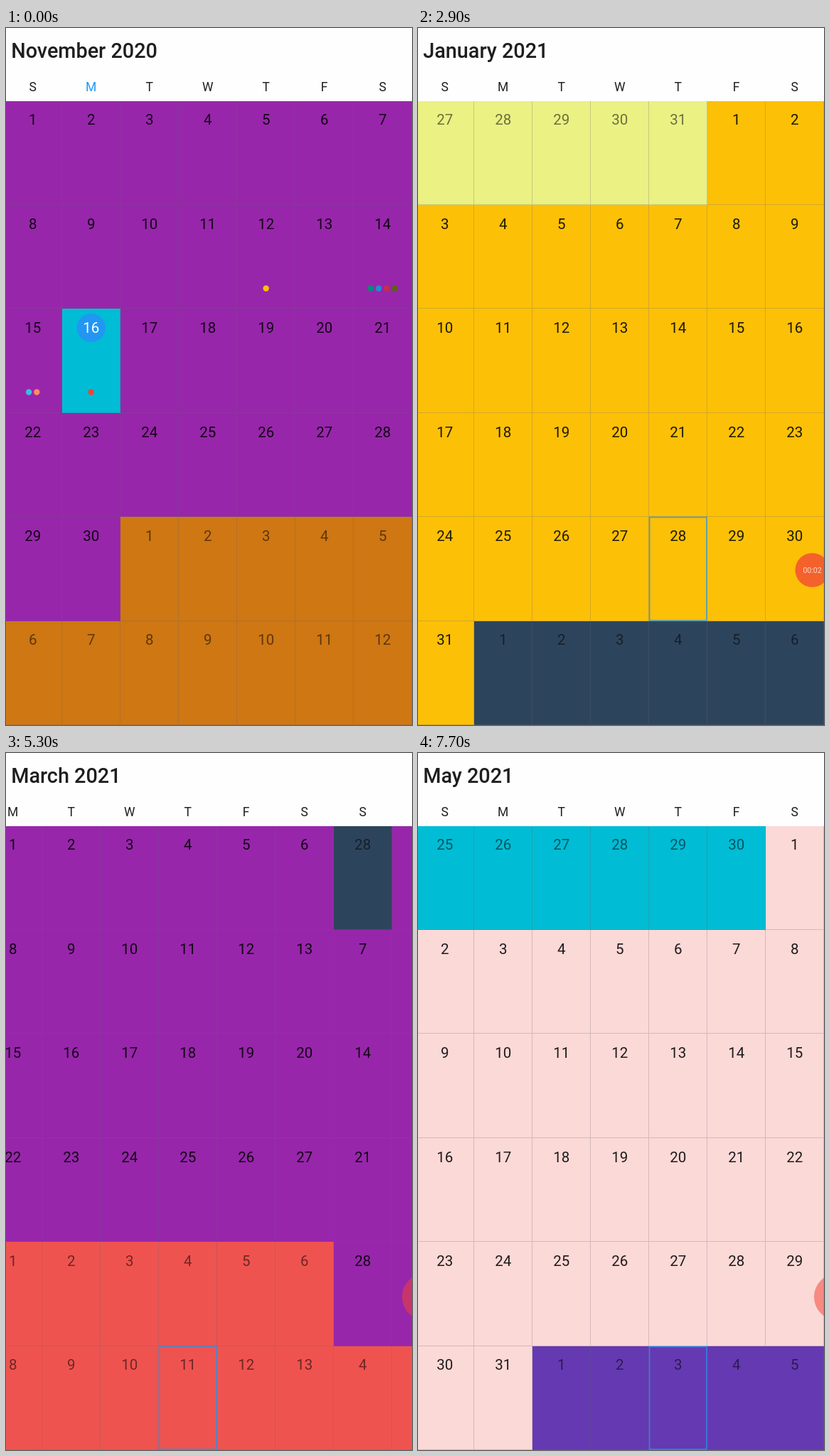
An HTML page with a canvas for the animation above (8000 ms loop, 571 px wide and 981 px high).

```html
<!DOCTYPE html>
<html lang="en">
<head>
<meta charset="utf-8">
<title>Calendar</title>
<style>
  html, body { margin: 0; width: 100%; height: 100%; overflow: hidden; background: #fefefe; }
  canvas { display: block; width: 571px; height: 981px; }
</style>
</head>
<body>
<canvas id="stage" width="571" height="981"></canvas>
<script>
const ctx = document.getElementById('stage').getContext('2d');
const W = 571, H = 981, LOOP = 8000, STEP = 100;
const CELL_W = 82, ROW_H = 146.4, TOP = 102.6, LEFT = -3, PAGE_W = 7 * CELL_W;
const FONT = 'Roboto, Arial, sans-serif';
const INK = 'rgba(0,0,0,.88)', FADED = 'rgba(0,0,0,.54)', BLUE = '#2196f3';

const purple = '#9826ab', violet = '#6539b2', cyan = '#00bcd4', pink = '#fbd9d7', slate = '#2d455c';

// Colours of the previous, current and next month's days
const themes = [
  [cyan, purple, '#ce7713'],
  ['#4aaf50', violet, cyan],
  ['#ebf183', '#fcc007', slate],
  [pink, cyan, violet],
  [slate, purple, '#ef5350'],
  [pink, '#69f1ae', violet],
  [cyan, pink, violet]
];

// Swipe starts, and the outlined cell [column, row] of each month
const swipes = [1600, 2401, 3906, 5100, 6090, 7250];
const marks = [null, [3, 5], [4, 4], [4, 5], [4, 4], [4, 4], [4, 5]];
const DRAG = 200, SETTLE = 300, PULL = 110, MARK_AT = 450;

const events = {
  12: ['#ffc107'],
  14: ['#008c78', '#1e8cd2', '#c82d4b', '#5a640a'],
  15: ['#3cbee1', '#ff8a65'],
  16: ['#f44336']
};

const clamp = v => Math.max(0, Math.min(1, v));
const mix = (a, b, k) => a + (b - a) * k;
const smooth = k => k * k * (3 - 2 * k);
const rowY = r => Math.round(TOP + ROW_H * r);

function text(str, x, y, size, color, align = 'center', weight = 400) {
  ctx.font = `${weight} ${size}px ${FONT}`;
  ctx.textAlign = align;
  ctx.fillStyle = color;
  ctx.fillText(str, x, y);
}

function disc(x, y, r, color) {
  ctx.fillStyle = color;
  ctx.beginPath();
  ctx.arc(x, y, r, 0, 2 * Math.PI);
  ctx.fill();
}

function swipeShift(u) {
  if (u <= 0) return 0;
  if (u < DRAG) return PULL * (u / DRAG) ** 2;
  const k = clamp((u - DRAG) / SETTLE);
  return mix(PULL, PAGE_W, 1 - (1 - k) ** 5);
}

const monthStart = m => new Date(Date.UTC(2020, 10 + m, 1));

function drawCell(m, date, col, row, x, theme) {
  const y = rowY(row), h = rowY(row + 1) - y;
  const offset = Math.sign(date - monthStart(m)) < 0 ? -1 : date >= monthStart(m + 1) ? 1 : 0;
  const day = date.getUTCDate(), cx = x + 40.7;
  const november = m === 0 && offset === 0;
  const today = november && day === 16;

  ctx.fillStyle = today ? cyan : theme[offset + 1];
  ctx.fillRect(x, y, CELL_W, h);
  ctx.fillStyle = 'rgba(100,100,115,.27)';
  ctx.fillRect(x + CELL_W - 1, y, 1, h);
  ctx.fillRect(x, y + h - 1, CELL_W - 1, 1);

  if (today) disc(cx + 0.1, y + 27, 20, BLUE);
  text(day, cx, TOP + ROW_H * row + 33.7, 20.5, today ? '#fff' : offset ? FADED : INK);

  const dots = november && events[day] || [];
  dots.forEach((c, i) => disc(cx + (i - (dots.length - 1) / 2) * 11.2, y + 117.5, 4.2, c));
}

function drawPage(m, left, theme, marked) {
  const first = monthStart(m);
  const lead = first.getUTCDay();
  [...'SMTWTFS'].forEach((s, c) =>
    text(s, left + c * CELL_W + 40.7, 88.5, 17.5, m === 0 && c === 1 ? BLUE : INK));

  for (let i = 0; i < 42; i++) {
    const date = new Date(first.getTime() + (i - lead) * 864e5);
    const col = i % 7;
    drawCell(m, date, col, Math.floor(i / 7), left + col * CELL_W, theme);
  }

  if (marked && marks[m]) {
    const [c, r] = marks[m];
    const y = rowY(r);
    ctx.strokeStyle = 'rgba(33,150,243,.8)';
    ctx.lineWidth = 1.6;
    ctx.strokeRect(left + c * CELL_W + 0.6, y + 0.6, CELL_W - 1.6, rowY(r + 1) - y - 1.6);
  }
}

function drawTimer(t) {
  const show = smooth(clamp((t - 300) / 200));
  if (!show) return;
  const shrink = clamp((t - 2220) / 500);
  const dock = smooth(clamp((t - 4400) / 400));
  const r = mix(mix(32, 24, shrink), 33, dock);
  const x = mix(mix(536, 554.5, shrink), 590, dock);
  const y = mix(mix(765, 763, shrink), 765.5, dock);
  const sec = Math.max(0, Math.floor((t - 300) / 1000));

  ctx.globalAlpha = show * mix(mix(1, 0.76, shrink), 0.52, dock);
  disc(x, y, r, '#f44336');
  const size = r * 0.4375;
  text('00:' + String(sec).padStart(2, '0'), x, y + size * 0.36, size, '#fff');
  ctx.globalAlpha = 1;
}

function draw(t) {
  let page = 0, u = Infinity;
  swipes.forEach((s, i) => {
    if (t > s) { page = i; u = t - s; }
  });
  const moving = u !== Infinity;
  const shift = moving ? Math.round(swipeShift(u)) : 0;
  const chosen = page + (moving && u >= DRAG ? 1 : 0);
  const theme = themes[chosen];

  ctx.fillStyle = '#fefefe';
  ctx.fillRect(0, 0, W, H);

  drawPage(page, LEFT - shift, theme, true);
  if (shift) drawPage(page + 1, LEFT - shift + PAGE_W, theme, u >= MARK_AT);

  const title = monthStart(chosen).toLocaleDateString('en-US',
    { month: 'long', year: 'numeric', timeZone: 'UTC' });
  text(title, 7.2, 42, 28.8, '#1e1e1e', 'left', 500);

  drawTimer(t);
}

const begin = performance.now();
function frame() {
  const t = (performance.now() - begin) % LOOP;
  draw(Math.floor(t / STEP) * STEP);
  requestAnimationFrame(frame);
}
frame();
</script>
</body>
</html>
```
